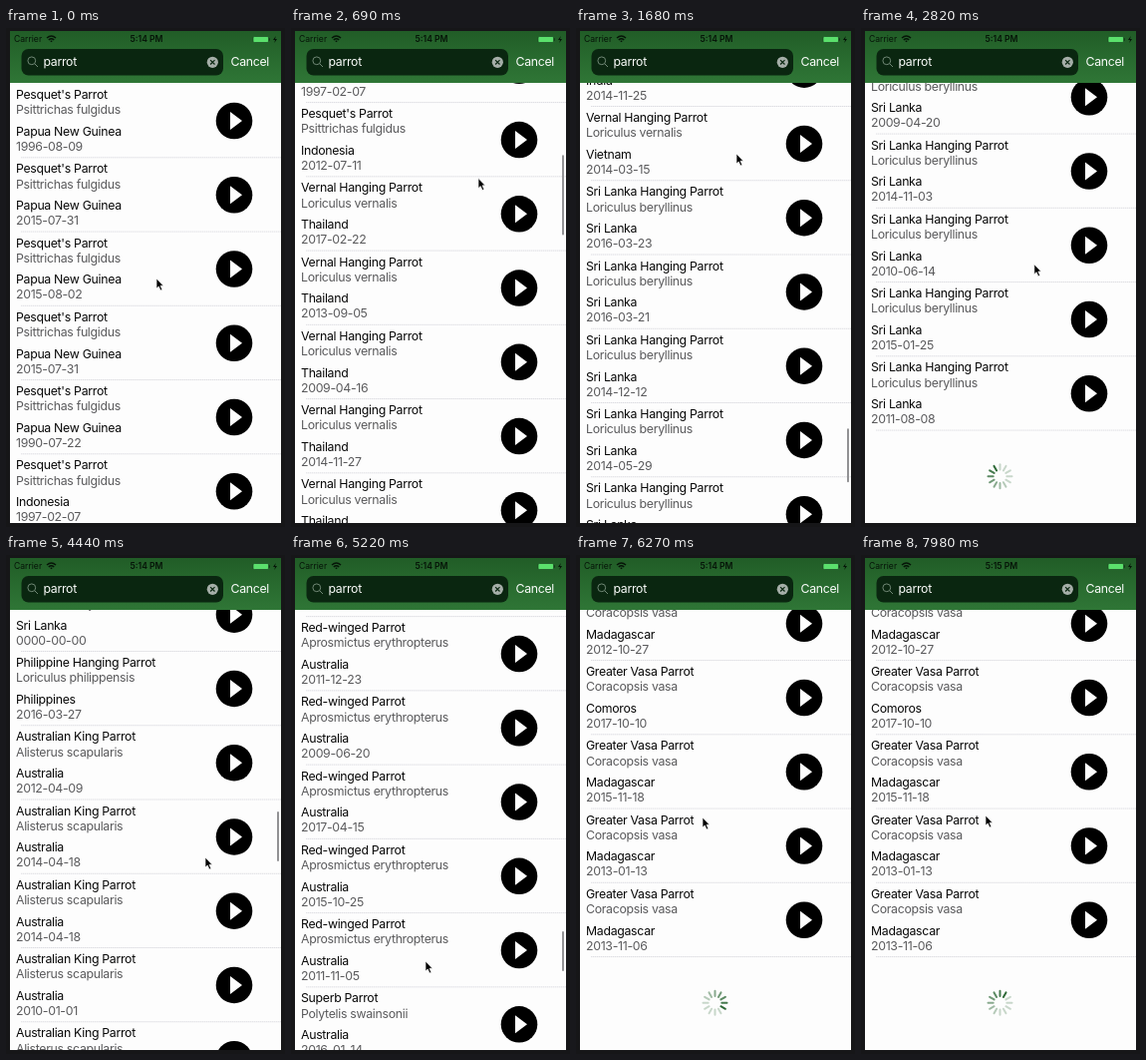
An HTML page that plays this animation: 280x500 px, repeating every 8000 ms.

```html
<!DOCTYPE html>
<html lang="en">
<head>
<meta charset="utf-8">
<title>Bird search</title>
<style>
html, body { margin: 0; width: 100%; height: 100%; overflow: hidden; background: #161618; }
svg { display: block; width: 280px; height: 500px; }
text { font: 12.3px Inter, "Open Sans", sans-serif; letter-spacing: -.3px; fill: #080808; }
.dim { fill: #5a5a5c; }
.light { fill: #fafcfa; }
.status { font-size: 8.6px; letter-spacing: 0; fill: #061408; }
.clock { font-weight: 600; text-anchor: middle; }
</style>
</head>
<body>
<svg viewBox="0 0 280 500">
  <defs>
    <linearGradient id="green" x2="0" y2="1">
      <stop stop-color="#215d27"/><stop offset="1" stop-color="#2f7636"/>
    </linearGradient>
    <clipPath id="view"><path d="M4 55H276V496H4Z"/></clipPath>
    <g id="play">
      <circle cx="229" cy="37.200" r="18.300"/>
      <path d="M225 28.200L237 37.200L225 46.200Z" fill="#fdfdfd"/>
    </g>
  </defs>
  <path d="M0 0H280V500H0Z" fill="#161618"/>
  <path d="M4 55H276V496H4Z" fill="#fdfdfd"/>
  <g clip-path="url(#view)">
    <g id="list"></g>
    <g id="spinner"></g>
    <rect id="bar" x="272" width="2" rx="1" fill="#929294"/>
  </g>

  <path d="M4 3H276V55H4Z" fill="url(#green)"/>
  <text class="status" x="8" y="14">Carrier</text>
  <g fill="none" stroke="#061408" stroke-width="1.5">
    <path d="M41 10Q45.500 6 50 10M42.800 12Q45.500 9.600 48.200 12"/>
    <path d="M44.700 13.300H46.300"/>
  </g>
  <text class="status clock" id="clock" x="141" y="14"></text>
  <rect x="248" y="8.500" width="15.500" height="6" rx="1.300" fill="#5be06c" stroke="#153a1b" stroke-width=".6"/>
  <path d="M264.500 10.300V12.700" stroke="#153a1b"/>
  <path d="M270.800 8L268 12H270L269.300 15L272 11H270Z" fill="#061408"/>
  <rect x="15.500" y="21" width="202.500" height="26.500" rx="7" fill="#0a2610"/>
  <g fill="none" stroke="#6f8674">
    <circle cx="25.800" cy="32.800" r="3.900"/><path d="M28.700 35.700L32 39"/>
  </g>
  <text class="light" x="37.500" y="38">parrot</text>
  <circle cx="207.300" cy="34.300" r="5.600" fill="#a5aea8"/>
  <path d="M205.100 32.100L209.500 36.500M209.500 32.100L205.100 36.500" stroke="#0a2610" stroke-width="1.200"/>
  <text class="light" x="225.500" y="38.300">Cancel</text>

  <path id="cursor" d="M0 0V10L2.300 8L4 12L5.800 11.200L4.100 7.300H7Z" fill="#040404" stroke="#fdfdfd" stroke-width=".7"/>
</svg>
<script>
const LOOP = 8000, TOP = 55.8, ROW = 74.25, PAGE = 50, LOADED_AT = 3450;
const $ = id => document.getElementById(id);

// first row, name, species, country
const groups = [
  [0, "Pesquet's Parrot", "Psittrichas fulgidus", "Papua New Guinea"],
  [5, "Pesquet's Parrot", "Psittrichas fulgidus", "Indonesia"],
  [7, "Vernal Hanging Parrot", "Loriculus vernalis", "Thailand"],
  [16, "Vernal Hanging Parrot", "Loriculus vernalis", "India"],
  [39, "Vernal Hanging Parrot", "Loriculus vernalis", "Vietnam"],
  [40, "Sri Lanka Hanging Parrot", "Loriculus beryllinus", "Sri Lanka"],
  [55, "Philippine Hanging Parrot", "Loriculus philippensis", "Philippines"],
  [56, "Australian King Parrot", "Alisterus scapularis", "Australia"],
  [68, "Red-winged Parrot", "Aprosmictus erythropterus", "Australia"],
  [83, "Superb Parrot", "Polytelis swainsonii", "Australia"],
  [88, "Greater Vasa Parrot", "Coracopsis vasa", "Madagascar"],
  [96, "Greater Vasa Parrot", "Coracopsis vasa", "Comoros"],
  [97, "Greater Vasa Parrot", "Coracopsis vasa", "Madagascar"]
];
// runs of dates by first row; the rest follow a rule
const dateRuns = {
  0: "1996-08-09 2015-07-31 2015-08-02 2015-07-31 1990-07-22 1997-02-07",
  13: "2016-04-13 2016-04-20 2015-02-01 2009-02-26 2015-01-02 2015-01-02 2014-12-18",
  38: "2014-11-25 2014-03-15 2016-03-23 2016-03-21 2014-12-12 2014-05-29",
  54: "0000-00-00 2016-03-27 2012-04-09 2014-04-18 2014-04-18 2010-01-01",
  78: "2011-12-23 2009-06-20 2017-04-15 2015-10-25 2011-11-05 2016-01-14",
  95: "2012-10-27 2017-10-10 2015-11-18 2013-01-13 2013-11-06"
};
const dates = [];
for (const [first, run] of Object.entries(dateRuns))
  run.split(" ").forEach((date, i) => dates[+first + i] = date);

const two = n => String(n).padStart(2, "0");
const dateOf = i => dates[i] ||
  `20${two(9 + i * 5 % 9)}-${two(1 + i * 7 % 12)}-${two(1 + i * 11 % 28)}`;

function rowMarkup(i) {
  const [, name, species, country] = groups.filter(g => g[0] <= i).pop();
  const line = (y, text, kind = "") => `<text class="${kind}" x="10" y="${y}">${text}</text>`;
  return `<g transform="translate(0 ${i * ROW})">` +
    line(15.3, name) + line(30.5, species, "dim") +
    line(52, country) + line(67, dateOf(i), "dim") +
    `<use href="#play"/><path d="M15 74H276" stroke="#d6d6dc" stroke-width=".8" stroke-dasharray="1.500 .5"/></g>`;
}
$("list").innerHTML = Array.from({ length: 2 * PAGE }, (_, i) => rowMarkup(i)).join("");
const rows = [...$("list").children];

$("spinner").innerHTML = Array.from({ length: 12 }, (_, i) =>
  `<path d="M0 -6.800V-12" transform="rotate(${i * 30})" stroke="#2f6a38" stroke-width="2" stroke-linecap="round"/>`).join("");
const spokes = [...$("spinner").children];

// time, scroll offset, bar top, bar height
const scrollKeys = [
  [0, 0, 58, 84], [200, 0, 58, 84], [600, 330, 110, 81], [1110, 1029.5, 234, 75],
  [1680, 2871, 401, 54], [2080, 3365, 440, 54], [3700, 3365, 220, 54],
  [4440, 4041.5, 257, 50], [5220, 5783.5, 377, 40], [5980, 7078, 453, 40], [LOOP, 7078, 453, 40]
];
// time, x, y
const cursorKeys = [
  [0, 151, 251], [350, 178, 350], [700, 188, 150], [1110, 185, 146], [1380, 172, 320],
  [1680, 161, 126], [2300, 165, 150], [3500, 190, 340], [4000, 202, 270], [4440, 200, 303],
  [4750, 170, 200], [5220, 135, 407], [5600, 130, 240], [6270, 127, 263], [6900, 125, 261], [LOOP, 125, 261]
];

// smooth interpolation that never overshoots a key
function sample(keys, t, col) {
  const k = Math.max(0, keys.findIndex(key => key[0] > t) - 1);
  const rate = i => i < 0 || i > keys.length - 2 ? 0 :
    (keys[i + 1][col] - keys[i][col]) / (keys[i + 1][0] - keys[i][0]);
  const slope = i => {
    const a = rate(i - 1), b = rate(i);
    return a * b > 0 ? 2 * a * b / (a + b) : 0;
  };
  const [a, b] = [keys[k], keys[k + 1]];
  const span = b[0] - a[0], u = (t - a[0]) / span, v = 1 - u;
  return a[col] * (1 + 2 * u) * v * v + b[col] * u * u * (3 - 2 * u) +
    span * u * v * (slope(k) * v - slope(k + 1) * u);
}

const clamp = x => Math.max(0, Math.min(1, x));
const pulse = (t, from, to) => clamp((t - from) / 60) * clamp((to - t) / 200);

function draw(t) {
  const offset = sample(scrollKeys, t, 1);
  const count = t < LOADED_AT ? PAGE : 2 * PAGE;
  $("list").setAttribute("transform", `translate(0 ${TOP - offset})`);
  rows.forEach((row, i) => {
    const y = i * ROW - offset;
    row.style.display = i < count && y > -ROW - 1 && y < 441 ? "" : "none";
  });

  $("spinner").setAttribute("transform", `translate(139.500 ${TOP + count * ROW + 46 - offset})`);
  const head = Math.floor(t * 12 / 1000 + 1.3);
  spokes.forEach((spoke, i) => {
    const age = (head - i + 120) % 12;
    spoke.style.opacity = Math.max(.25, 1 - age * .11);
  });

  $("bar").setAttribute("y", sample(scrollKeys, t, 2));
  $("bar").setAttribute("height", sample(scrollKeys, t, 3));
  $("bar").style.opacity = Math.max(pulse(t, 200, 2400), pulse(t, 3700, 6230));

  $("clock").textContent = t < 6900 ? "5:14 PM" : "5:15 PM";
  $("cursor").setAttribute("transform",
    `translate(${sample(cursorKeys, t, 1)} ${sample(cursorKeys, t, 2)})`);
}

const start = performance.now();
function tick() {
  draw((performance.now() - start) % LOOP);
  requestAnimationFrame(tick);
}
tick();
</script>
</body>
</html>
```
